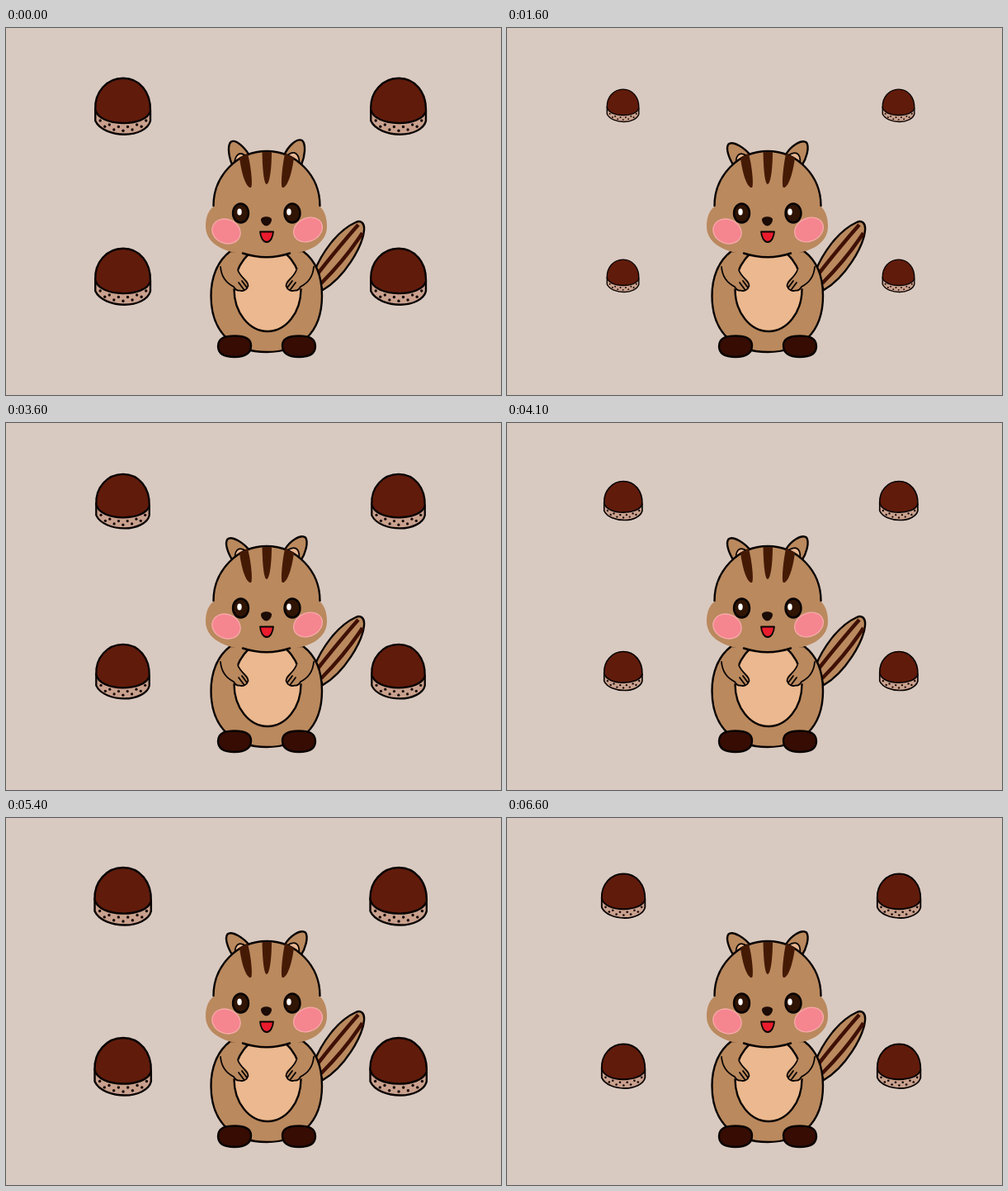
Animation of 600 by 444 pixels, one loop 6700 ms. Source, as an HTML page:

```html
<!DOCTYPE html>
<html lang="en">
<head>
<meta charset="utf-8">
<title>Chipmunk and chestnuts</title>
<style>
  html, body { margin: 0; width: 100%; height: 100%; overflow: hidden; background: #d9cac1; }
  svg { display: block; width: 600px; height: 444px; }
  .line { stroke: #080302; stroke-width: 2.4; stroke-linejoin: round; stroke-linecap: round; }
  .thin { stroke-width: 1.8; }
  .fur { fill: #ba895e; }
  .pale { fill: #e9b691; }
  .dark { fill: #360c03; }
  .stripe { fill: #451a05; }
  .none { fill: none; }
  .blush { fill: #f5858f; stroke: #f7a9aa; stroke-width: 1.3; }
</style>
</head>
<body>
<svg viewBox="0 0 600 444">
  <defs>
    <!-- chestnut, drawn around the point it grows from -->
    <g id="nut">
      <path class="line" fill="#c9a18e" d="M-31 5V20C-26 31-10 36.500 5 36.500S34 30 36.300 20V8Z"/>
      <path class="line" fill="#611b0b" d="M-31 6C-32-15-17-32 3-32S37-15 36.300 8C31 28-27 28-31 6Z"/>
      <g id="dots" fill="#160806"></g>
    </g>
    <g id="arm">
      <path class="fur" d="M266 290L281 292C283 301 293 303 294 309C294 314 289 318 284 317.500L274 315Z"/>
      <path class="line thin none" d="M260 289C261 301 268 309 276 313C278 317 280 318 283 317.500C287 319 292 317 293.500 312C294 306 285 303 281 293M282 308L288 316M286 306L292 314"/>
    </g>
    <g id="foot">
      <path class="line dark" d="M257 385C257 375 265 372.500 277 372.500S297 376 297 384C297 394 289 398 277 398S257 395 257 385Z"/>
    </g>
  </defs>

  <g id="nuts"></g>

  <path class="line fur" d="M374 294C382 274 400 246 424 235C430 232 435 236 434 245C432 265 410 302 384 317Z"/>
  <path class="none" stroke="#3f1005" stroke-width="4.500" d="M378 297Q404 264 427 238M382 309Q411 280 432 248"/>

  <path class="line fur" d="M272 270C256 282 248.500 302 248.500 324C248.500 370 277 392 316 392S383 370 383 324C383 302 376 282 360 270Z"/>
  <ellipse class="line" fill="#ebb88f" cx="317" cy="316" rx="40.500" ry="51"/>
  <use href="#arm"/>
  <use href="#arm" transform="translate(633) scale(-1 1)"/>
  <use href="#foot"/>
  <use href="#foot" transform="translate(632) scale(-1 1)"/>

  <g id="earL">
    <path class="line fur" d="M275 167C268 156 265 145 268.500 140.500C274 136 288 145 296 155Z"/>
    <path class="line thin pale" d="M278 168C276 155 281 148 291 155Z"/>
  </g>
  <g id="earR">
    <path class="line fur" d="M357 167C363 158 367 144 363 138.500C357 134 344 143 338 153Z"/>
    <path class="line thin pale" d="M354 168C358 154 352 147 341 154Z"/>
  </g>

  <path class="fur" d="M251.500 216C251.500 179 280 149 316 149S380.500 179 380.500 216C386 221 389 229 389 240C389 259 371 271 344 273Q316 281 287 273C261 271 242 259 242 240C242 229 245 221 251.500 216Z"/>
  <path class="line none" d="M251.500 215C251.500 179 280 149 316 149S380.500 179 380.500 215M287 272.500Q316 282 344 272.500"/>
  <path class="stripe" d="M310.500 150H322C322 174 319 189 316 189S311 174 310.500 150ZM283 157L293 152C298 172 299 192 297 193C292 194 286 180 283 157ZM338 152L349 157C346 180 340 194 335 193C333 192 334 172 338 152Z"/>

  <g id="eye">
    <ellipse class="line" fill="#301404" cx="284.500" cy="224" rx="9.500" ry="11.500"/>
  </g>
  <use href="#eye" x="62.500"/>
  <g fill="#fff">
    <ellipse cx="283" cy="222.500" rx="2.700" ry="4"/>
    <ellipse cx="343" cy="222.500" rx="2.700" ry="4"/>
  </g>
  <ellipse class="blush" cx="267" cy="246" rx="17.500" ry="14.500" transform="rotate(22 267 246)"/>
  <ellipse class="blush" cx="366" cy="244" rx="18" ry="14" transform="rotate(-25 366 244)"/>
  <path fill="#1c0b06" d="M309 232C309 227 322 227 322 232C322 236 318 239.500 315.500 239.500S309 236 309 232Z"/>
  <path class="line thin" fill="#ea1c2d" d="M308 246.500H324C323.500 253 320.500 259 316 259S308.500 253 308 246.500Z"/>
</svg>
<script>
  const LOOP = 6700, STEP = 100, PERIOD = 2630, PEAK = 3050;
  const el = id => document.getElementById(id);

  // two staggered rows of specks that follow the curved base
  let specks = '';
  for (let i = 0; i < 11; i++) {
    const x = -25 + i * 5.6;
    const y = (i % 2 ? 32 : 27.5) - ((x - 3) / 30) ** 2 * 9;
    specks += `<circle cx="${x}" cy="${y}" r="1.7"/>`;
  }
  el('dots').innerHTML = specks;

  const nuts = [[139, 92.5], [473, 92.5], [139, 298.5], [473, 298.5]].map(([x, y]) => {
    const nut = document.createElementNS('http://www.w3.org/2000/svg', 'use');
    nut.setAttribute('href', '#nut');
    el('nuts').append(nut);
    return { nut, x, y };
  });

  // nut width: slow around its largest size, quick through its smallest
  function nutWidth(t) {
    const turns = (t - PEAK) / PERIOD;
    const away = Math.abs(turns - Math.round(turns)) * PERIOD / 1000;
    return 72 - 21.3 * away ** 2.43;
  }

  function draw(now) {
    const t = Math.floor(now % LOOP / STEP) * STEP;
    const size = nutWidth(t) / 70;
    for (const { nut, x, y } of nuts)
      nut.setAttribute('transform', `translate(${x} ${y}) scale(${size})`);

    const perk = Math.max(0, 1 - t / 300) ** 2;
    el('earL').setAttribute('transform', `rotate(${12 * perk} 285 160)`);
    el('earR').setAttribute('transform', `rotate(${-10 * perk} 347 160)`);
    requestAnimationFrame(() => draw(performance.now() - start));
  }
  const start = performance.now();
  draw(0);
</script>
</body>
</html>
```
